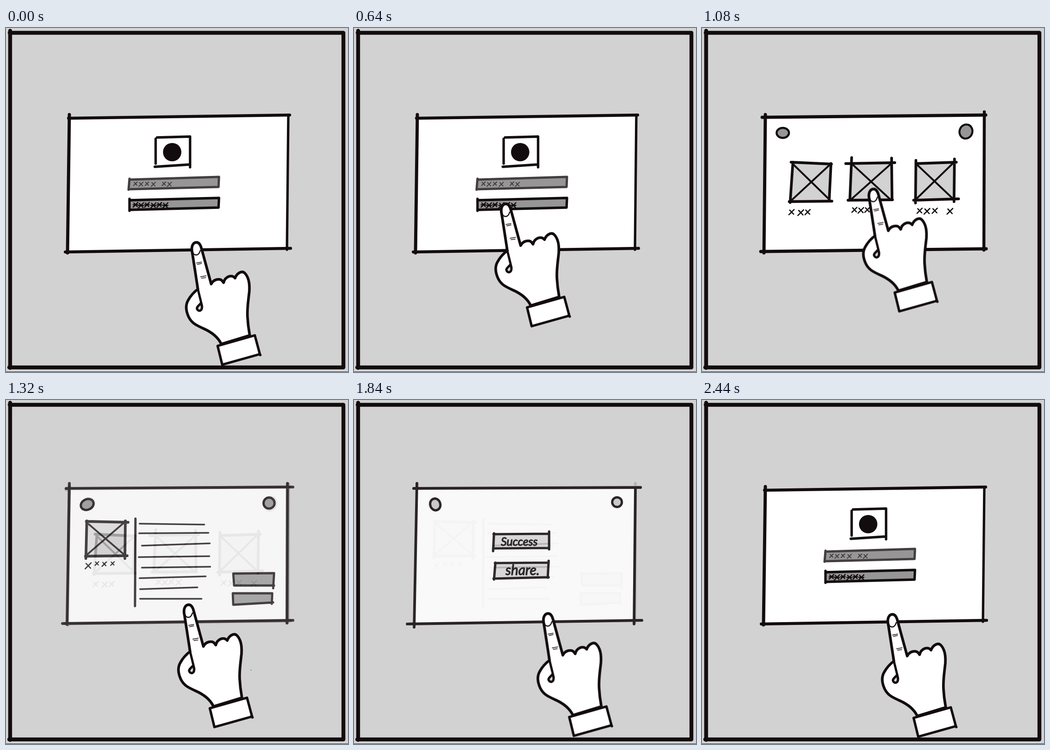
Write an HTML page with a canvas that moves like this. It is 745 by 751 pixels and loops after 3000 ms.

```html
<!DOCTYPE html>
<html lang="en">
<head>
<meta charset="utf-8">
<title>Wireframe walkthrough</title>
<style>
  html, body { margin: 0; width: 100%; height: 100%; overflow: hidden; background: #d2d2d2; }
  canvas { display: block; }
</style>
</head>
<body>
<canvas id="stage" width="745" height="751"></canvas>
<script>
const W = 745, H = 751, LOOP = 3000, STEP = 40, FADE = 320;
const INK = '#130c0e', PALE = '#d2d2d2', GREY = '#969696', WHITE = '#fff';
const stage = document.getElementById('stage').getContext('2d');

function ink(g, path, width, color = INK) {
  g.lineWidth = width;
  g.strokeStyle = color;
  g.lineCap = g.lineJoin = 'round';
  g.stroke(new Path2D(path));
}

function area(g, path, color) {
  g.fillStyle = color;
  g.fill(new Path2D(path), 'evenodd');
}

// Cuts a window through the panel, so that whatever lies below shows.
function hole(g, path) {
  g.globalCompositeOperation = 'destination-out';
  area(g, path, INK);
  g.globalCompositeOperation = 'source-over';
}

function oval(g, x, y, rx, ry, tilt, width, color) {
  g.beginPath();
  g.ellipse(x, y, rx, ry, tilt, 0, Math.PI * 2);
  g.globalCompositeOperation = color ? 'source-over' : 'destination-out';
  g.fillStyle = color || INK;
  g.fill();
  g.globalCompositeOperation = 'source-over';
  g.lineWidth = width;
  g.strokeStyle = INK;
  g.stroke();
}

// A row of small scribbled crosses, or stars when a middle stroke is wanted.
function crosses(g, xs, y, size, width, color = INK, star = false) {
  xs.forEach((x, i) => {
    const s = size + (i % 2) * 0.6, dy = (i % 2) * 1.2;
    let path = `M${x - s * .7} ${y - s * .8 + dy}L${x + s * .8} ${y + s * .8 + dy}` +
               `M${x + s} ${y - s + dy}L${x - s} ${y + s + dy}`;
    if (star) path += `M${x - s} ${y + dy}H${x + s}`;
    ink(g, path, width, color);
  });
}

function lettering(g, text, x, y, size) {
  g.font = `italic ${size}px Lato, sans-serif`;
  g.fillStyle = g.strokeStyle = INK;
  g.lineWidth = 1.3;
  g.fillText(text, x, y);
  g.strokeText(text, x, y);
}

function layer(draw) {
  const canvas = document.createElement('canvas');
  canvas.width = W;
  canvas.height = H;
  draw(canvas.getContext('2d'));
  return canvas;
}

const backdrop = layer(g => {
  g.fillStyle = PALE;
  g.fillRect(0, 0, W, H);
  ink(g, 'M8 10.5L735 10.5M9 6L9 742M735 12L735 741M7 741L735 741', 8.4);
  g.fillStyle = '#3a3538';
  g.fillRect(0, 750, W, 1);
});

const login = layer(g => {
  area(g, 'M137 196L616 190L613 482L134 488Z', WHITE);
  ink(g, 'M136 197L618 190M129 489L620 481', 6.3);
  ink(g, 'M138 189L134 491', 7);
  ink(g, 'M615 190L612 484', 5.3);
  ink(g, 'M329 239L401 237M326 242L326 296M401 237L401 304M324 303L400 298', 5.3);
  g.beginPath();
  g.arc(362, 271, 20, 0, Math.PI * 2);
  g.fillStyle = INK;
  g.fill();

  area(g, 'M270 331L464 326L463 347L268 351Z', GREY);
  ink(g, 'M269 329L267 353M269 331L464 325L463 347L268 352', 5, '#433e40');
  crosses(g, [282, 294, 307, 321, 344, 356], 340, 4, 2, '#433e40');

  area(g, 'M270 376L464 371L463 392L269 397Z', GREY);
  ink(g, 'M269 373L269 399M269 376L464 371L463 392L269 397', 5.3);
  crosses(g, [282, 294, 307, 321, 334, 347], 386, 5, 2.5, INK, true);
});

const gallery = layer(g => {
  area(g, 'M138 194L615 190L615 482L135 488Z', WHITE);
  ink(g, 'M131 195L618 190M138 189L135 491M128 488L619 482', 7);
  ink(g, 'M615 183L614 485', 6.5);
  oval(g, 176, 229, 13.5, 11, 0, 4.4, GREY);
  oval(g, 575, 226, 14, 15.5, .3, 4.4, GREY);

  hole(g, 'M198 294L281 296L278 378L192 379Z');
  ink(g, 'M194 293L282 297M198 293L192 381M281 296L277 378M190 379L283 378', 5.8);
  ink(g, 'M197 296L278 375M279 298L194 377', 4);
  hole(g, 'M326 296L413 294L414 376L322 376Z');
  ink(g, 'M313 296L420 294M326 283L322 376M413 284L414 375M318 376L415 375', 5.8);
  ink(g, 'M328 298L410 374M410 298L325 374', 4);
  hole(g, 'M466 296L550 293L549 374L465 376Z');
  ink(g, 'M466 296L554 293M466 289L465 382M550 286L549 379M461 376L559 373', 5.8);
  ink(g, 'M468 298L547 373M546 296L467 373', 4);

  crosses(g, [195, 215, 230], 402, 5.6, 2.6);
  crosses(g, [332, 346, 360, 376], 397, 5.4, 2.6);
  crosses(g, [474, 490, 507, 540], 399, 5.6, 2.6);
});

const detail = layer(g => {
  area(g, 'M137 193L613 190L612 482L134 487Z', WHITE);
  ink(g, 'M131 193L625 190M138 182L133 490M613 182L612 487M123 488L625 481', 6.2);
  oval(g, 177, 228, 14.5, 11.5, -.45, 5, GREY);
  oval(g, 573, 225, 12, 12, 0, 5, GREY);

  hole(g, 'M176 265L260 267L259 340L174 341Z');
  ink(g, 'M175 265L266 267M176 264L174 346M260 264L259 346M173 341L264 340', 5.8);
  ink(g, 'M180 271L258 338M258 267L176 338', 3.8);
  crosses(g, [179], 362, 6.5, 2.6);
  crosses(g, [198, 214, 232], 357, 4, 2.4);

  ink(g, 'M282 259L281 450', 5);
  ink(g, 'M291 270L432 272M290 291L441 290M296 318L444 313M289 343L443 341' +
         'M296 366L445 364M291 389L435 385M292 413L417 409M292 434L426 434', 3.6);

  area(g, 'M495 379L584 378L582 405L497 405Z', GREY);
  ink(g, 'M497 405L495 379L584 378L582 411M497 405L584 405', 4.8);
  area(g, 'M494 423L580 422L580 442L495 447Z', GREY);
  ink(g, 'M494 422L580 422L579 445M494 422L495 447L582 442', 4.8);
  g.fillStyle = INK;
  g.fillRect(533, 589, 1.5, 1.5);
});

const done = layer(g => {
  area(g, 'M136 192L613 191L611 481L132 487Z', WHITE);
  ink(g, 'M130 193L624 191M116 489L627 481', 6.2);
  ink(g, 'M137 182L131 496M613 192L610 489', 5.8);
  oval(g, 177, 228, 11, 13, -.3, 5);
  oval(g, 573, 223, 10.5, 10.5, 0, 5);

  hole(g, 'M305 293L425 292L425 323L303 324Z');
  ink(g, 'M304 293L425 292M305 291L303 330M425 287L425 326M303 324L424 323', 5.2);
  hole(g, 'M307 356L424 355L422 387L305 390Z');
  ink(g, 'M307 356L424 355M308 355L305 392M424 351L422 388M304 390L424 387', 5.2);

  lettering(g, 'Success', 320, 318, 25);
  lettering(g, 'share.', 330, 382, 30);
});

const hand = layer(g => {
  const outline = 'M418 570L406 492C402 476 408 468 415 468C421 468 424 474 426 482L447 559' +
    'C452 548 466 546 471 552L474 556C477 543 491 537 499 546C503 535 514 529 520 535' +
    'C529 544 531 560 530 575C528 595 525 610 526 630C527 650 529 660 531 671L469 690' +
    'C462 675 448 664 430 656C415 649 405 645 398 631C391 616 391 604 397 594C402 585 410 576 418 570';
  const curl = 'M425 600L427 609C427 618 419 620 416 613C415 609 420 606 425 600';
  area(g, outline + curl, WHITE);
  ink(g, outline, 5.8);
  ink(g, 'M417 566L427 607' + curl, 5);
  ink(g, 'M406 484C407 499 420 499 423 486', 2.4);
  ink(g, 'M415 513L426 511M417 516L426 514M424 543L436 541M426 546L435 545', 1.6);
  const cuff = 'M461 694L542 671L553 712L471 735Z';
  area(g, cuff, WHITE);
  ink(g, cuff + 'M552 710L554 714', 5.3);
});

const screens = [login, gallery, detail, done];
const taps = [680, 1160, 1640, 2120];

// Hand offsets from rest: time, x, y.
const keys = [
  [0, 0, 0], [360, -60, -60], [560, -84, -84], [680, -84, -84],
  [840, -19, -12], [920, 0, 0], [1120, -46, -130], [1160, -46, -130],
  [1320, -17, -21], [1400, 0, 0], [1620, 128, -82], [1640, 128, -82],
  [1860, 0, 0], [2090, -45, -161], [2120, -45, -161], [2440, 0, 0], [LOOP, 0, 0]
];

function slope(i, axis) {
  return (keys[i + 1][axis] - keys[i][axis]) / (keys[i + 1][0] - keys[i][0]);
}

// Harmonic mean of neighbouring slopes: smooth, without overshoot.
function tangent(i, axis) {
  if (i === 0 || i === keys.length - 1) return 0;
  const a = slope(i - 1, axis), b = slope(i, axis);
  return a * b > 0 ? 2 * a * b / (a + b) : 0;
}

function handAt(t, axis) {
  let i = 0;
  while (i < keys.length - 2 && t >= keys[i + 1][0]) i++;
  const span = keys[i + 1][0] - keys[i][0];
  const u = (t - keys[i][0]) / span, v = 1 - u;
  return keys[i][axis] * (1 + 2 * u) * v * v + tangent(i, axis) * span * u * v * v +
    keys[i + 1][axis] * u * u * (3 - 2 * u) - tangent(i + 1, axis) * span * u * u * v;
}

function show(image, alpha) {
  stage.globalAlpha = alpha;
  stage.drawImage(image, 0, 0);
  stage.globalAlpha = 1;
}

function render(t) {
  stage.drawImage(backdrop, 0, 0);
  const passed = taps.filter(tap => t > tap).length;
  const u = passed ? Math.min(1, (t - taps[passed - 1]) / FADE) : 1;
  const shown = 1 - (1 - u) ** 2;
  if (shown < 1) show(screens[passed - 1], 1 - shown);
  show(screens[passed % screens.length], shown);
  stage.drawImage(hand, handAt(t, 1), handAt(t, 2));
}

const start = performance.now();
function tick() {
  const t = (performance.now() - start) % LOOP;
  render(Math.floor(t / STEP) * STEP);
  requestAnimationFrame(tick);
}
tick();
</script>
</body>
</html>
```
